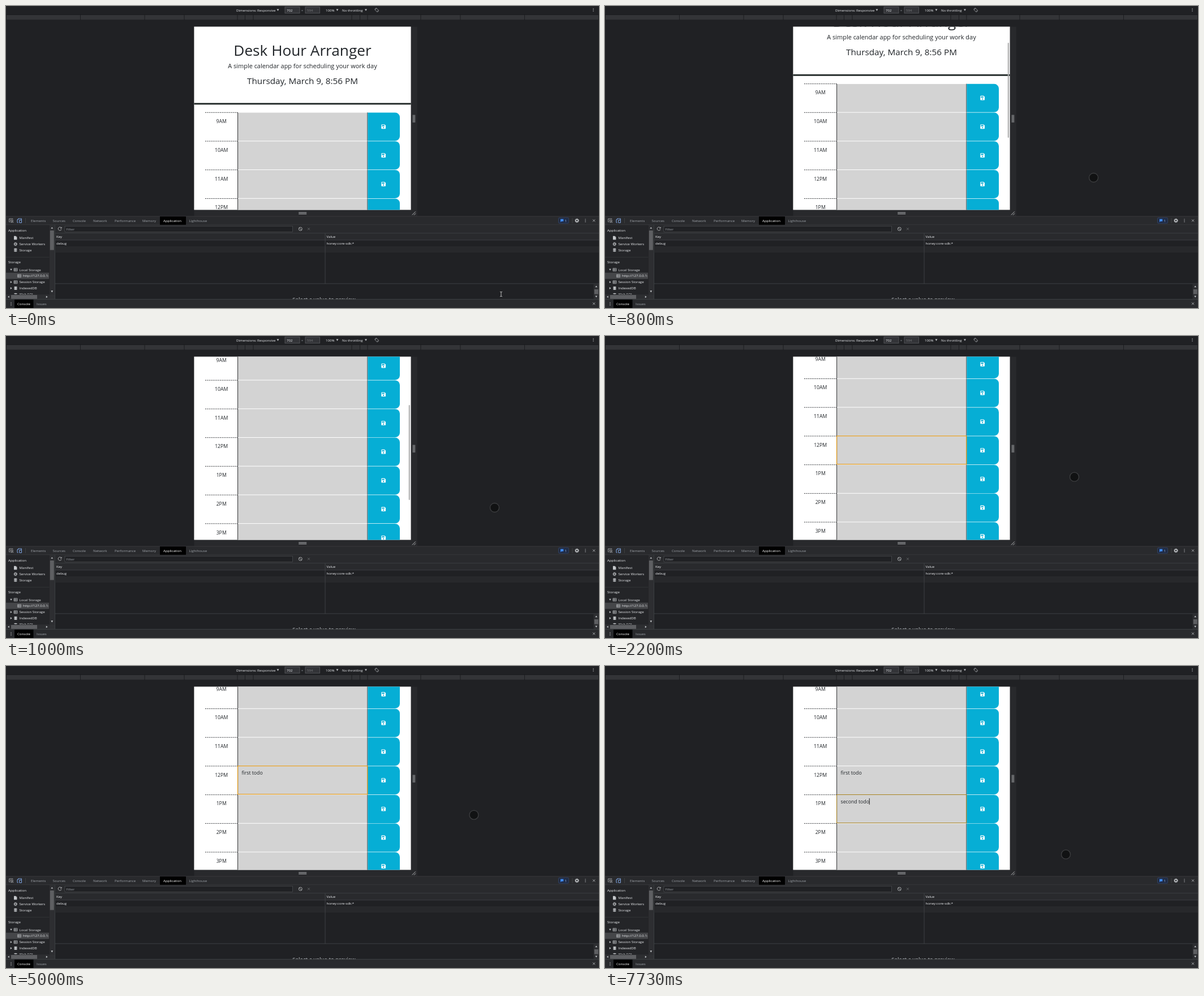
These frames come from a looping animation (1048x534 px, 8 s). An HTML page:

```html
<!DOCTYPE html>
<html lang="en">
<head>
<meta charset="utf-8">
<title>Day planner in a responsive preview</title>
<style>
html, body { margin: 0; width: 100%; height: 100%; overflow: hidden; background: #202124; }
svg { display: block; width: 100vw; height: 100vh; }
text { font-family: "Open Sans", "Noto Sans", sans-serif; white-space: pre; }
.ui text { font-size: 6.15px; fill: #e8eaed; }
.ui .dim { fill: #9aa0a6; }
.page text { fill: #212529; font-size: 8.74px; }
.page .mid { text-anchor: middle; }
</style>
</head>
<body>
<svg id="stage" viewBox="0 0 1048 534" preserveAspectRatio="none">
  <defs>
    <clipPath id="view"><rect x="332.4" y="36.6" width="383.2" height="324"/></clipPath>
    <clipPath id="side"><rect x="0" y="387" width="76" height="123"/></clipPath>
    <clipPath id="preview"><rect x="87" y="491" width="950" height="27.5"/></clipPath>
  </defs>
  <rect width="1048" height="534" fill="#202124"/>
  <g id="chrome" class="ui"></g>
  <g clip-path="url(#view)" class="page">
    <rect x="332" y="36" width="384" height="325" fill="#fff"/>
    <g id="page"></g>
    <rect id="thumb" x="711.8" width="2" height="168" rx="1" fill="#a9a9a9"/>
  </g>
  <g id="touch">
    <circle r="8" fill="#111213" stroke="#3d3e40" stroke-width="1.3"/>
  </g>
  <path id="beam" d="M-2-4.2Q0-4.2 0-3.2Q0-4.2 2-4.2M0-3.2V3.2M-2 4.2Q0 4.2 0 3.2Q0 4.2 2 4.2" fill="none" stroke="#e4e4e4" stroke-width=".8"/>
</svg>
<script>
const NS = "http://www.w3.org/2000/svg";
const $ = id => document.getElementById(id);
const chrome = $("chrome"), page = $("page");

function add(parent, tag, attrs, content) {
  const el = document.createElementNS(NS, tag);
  for (const k in attrs) el.setAttribute(k, attrs[k]);
  if (content !== undefined) el.textContent = content;
  parent.appendChild(el);
  return el;
}
const box = (x, y, width, height, fill, more) =>
  add(chrome, "rect", { x, y, width, height, fill, ...more });
const label = (x, y, s, more) => add(chrome, "text", { x, y, ...more }, s);
const line = (d, stroke = "#c4c7ca", width = .8, more) =>
  add(chrome, "path", { d, stroke, "stroke-width": width, fill: "none", ...more });
const shape = (d, fill = "#c4c7ca") => add(chrome, "path", { d, fill });
const cross = (x, y, color) => line(`M${x - 2} ${y - 2}l4 4m0-4l-4 4`, color);
const down = (x, y, r = 2) => shape(`M${x - r} ${y - r * .8}h${2 * r}l${-r} ${r * 1.7}z`);
const up = (x, y) => shape(`M${x - 1.8} ${y + 1.2}h3.6l-1.8-2.6z`);
const right = (x, y) => shape(`M${x - 1.2} ${y - 1.9}v3.8l2.8-1.9z`);
const left = (x, y) => shape(`M${x + 1.2} ${y - 1.8}v3.6l-2.6-1.8z`);
const ring = (cx, cy, r, more) =>
  add(chrome, "circle", { cx, cy, r, fill: "none", stroke: "#c4c7ca", "stroke-width": .8, ...more });
const dots = (x, y) => [-2.3, 0, 2.3].forEach(d => add(chrome, "circle", { cx: x, cy: y + d, r: .65, fill: "#c4c7ca" }));

function drawTop() {
  label(407, 9.5, "Dimensions: Responsive");
  down(480.5, 7);
  box(493, 1.8, 26, 11, "#333438", { stroke: "#626366", "stroke-width": .7 });
  label(496, 9.5, "702");
  label(521.7, 9.7, "×", { class: "dim" });
  box(529, 1.8, 25.5, 11, "#333438", { stroke: "#626366", "stroke-width": .7 });
  label(532, 9.5, "594", { style: "fill:#77797c" });
  label(565, 9.5, "100%");
  down(585.5, 7);
  label(594, 9.5, "No throttling");
  down(636, 7);
  add(chrome, "rect", { x: 653.2, y: 4.8, width: 4, height: 4.6, transform: "rotate(-45 655.2 7.1)", fill: "none", stroke: "#a5a8ab", "stroke-width": .7 });
  line("M651.6 6.5A3.7 3.7 0 0 1 655 3.5M658.8 7.7A3.7 3.7 0 0 1 655.4 10.7", "#a5a8ab", .7);
  dots(1038, 7);
  box(0, 14.8, 1048, 10.2, "#18191b");
  const half = [87, 101.5, 115, 209, 279, 392.5, 523.5];
  const stops = [...half.map(v => 524 - v).reverse(), ...half.map(v => 524 + v)];
  stops.slice(1).forEach((x, i) => box(stops[i] + .4, 15.8, x - stops[i] - .8, 8.6, "#333437"));
}

function drawFrame() {
  box(715.6, 36.6, 11.2, 335, "#28292c");
  box(332.4, 360.6, 394.4, 11, "#28292c");
  line("M719.7 192.5v13.5M722.2 192.5v13.5", "#b8babd", 1);
  line("M517.2 365.2h14M517.2 367.7h14", "#b8babd", 1);
  line("M717.8 369.5l6-6M721 369.7l3-3", "#b8babd", 1);
}

function drawTabs() {
  box(0, 371.8, 1048, 15.2, "#292a2d");
  box(0, 371.6, 1048, .7, "#3f4043");
  box(0, 386.7, 1048, .7, "#494c50");
  line("M7 381.8h-1.3v-5.6h6.2v1.6M8 378.3l1.3 4.8 1-1.9 1.9 1.9.7-.7-1.9-1.9 1.9-.9z", "#c4c7ca", .7);
  line("M21.5 383h-1.5v-5.3h1.5v-1.7h6v2.3M23.8 378.5h3.7v4.7h-3.7z", "#8ab4f8", .9);
  line("M34.5 375v9", "#4b4d50", .6);
  box(272, 372.2, 46, 14.6, "#000");
  const tabs = { Elements: 44, Sources: 82.5, Console: 118, Network: 154, Performance: 192, Memory: 241, Application: 278, Lighthouse: 323.5 };
  for (const name in tabs)
    label(tabs[name], 381.8, name, { style: name == "Application" ? "fill:#fff" : "fill:#9fa4aa" });
  box(976.5, 374.3, 18, 10, "#202c45", { rx: 1.5, stroke: "#3b4e74", "stroke-width": .6 });
  shape("M980 376.8h5.2v4h-3.6l-1.6 1.5z", "#3f8cff");
  label(987.2, 381.8, "1", { style: "fill:#a9c7fa" });
  line("M1001 375v9", "#4b4d50", .6);
  ring(1009, 379.4, 2.1, { "stroke-width": 1.5 });
  ring(1009, 379.4, 3.3, { "stroke-width": 1, "stroke-dasharray": "1.3 1.29" });
  dots(1024, 379.4);
  cross(1039, 379.4);
}

function drawSidebar() {
  box(0, 387.3, 76.5, 131.2, "#242528");
  const outer = add(chrome, "g", { "clip-path": "url(#side)" });
  const put = (x, y, s) => add(outer, "text", { x, y }, s);
  add(outer, "rect", { x: 0, y: 471.6, width: 76, height: 11, fill: "#454649" });
  put(4, 399.2, "Application");
  put(23.5, 412.2, "Manifest");
  put(23.5, 423.2, "Service Workers");
  put(23.5, 434.2, "Storage");
  put(4, 455.4, "Storage");
  put(23.5, 468.5, "Local Storage");
  put(30, 479.4, "http://127.0.0.1:5500");
  put(23.5, 490.4, "Session Storage");
  put(23.5, 501.3, "IndexedDB");
  put(23.5, 512.2, "Web SQL");
  box(0, 443.8, 76.5, .6, "#3b3c3f");
  shape("M14 406.7h3.4l2 2v4.6h-5.4z");
  ring(16.8, 421, 1.8, { "stroke-width": 1.2 });
  ring(16.8, 421, 2.9, { "stroke-width": .9, "stroke-dasharray": "1.1 1.18" });
  [429.4, 431.5, 433.6].forEach(y => add(chrome, "ellipse", { cx: 16.8, cy: y, rx: 2.9, ry: .9, fill: "#c4c7ca" }));
  const grid = (x, y) => line(`M${x} ${y - 2.5}h6v5h-6zM${x} ${y - .8}h6M${x} ${y + .9}h6M${x + 2.2} ${y - 2.5}v5`, "#b6b9bc", .7);
  grid(14, 466.3); grid(20.5, 477.2); grid(14, 488.2);
  [497, 499, 501].forEach(y => add(chrome, "ellipse", { cx: 17, cy: y, rx: 2.9, ry: .9, fill: "#c4c7ca" }));
  add(chrome, "ellipse", { cx: 17, cy: 508.6, rx: 2.9, ry: .9, fill: "#c4c7ca" });
  down(9, 466.2, 1.8);
  right(9, 488.2); right(9, 499);
  box(76.8, 387.3, 9.2, 123, "#2d2e31");
  box(77.8, 397, 7, 34.5, "#5e5f62");
  up(81.3, 392.3); down(81.3, 504.8, 1.8);
  box(0, 510.2, 76.8, 8.3, "#2d2e31");
  box(9, 511, 46, 6.8, "#5e5f62");
  left(4.5, 514.3); right(72, 514.3);
  box(76.8, 510.2, 9.2, 8.3, "#303134");
  box(86, 387.3, .7, 131.2, "#494c50");
}

function drawTable() {
  box(86.7, 387.3, 962, 14.4, "#292a2d");
  line("M97.8 392.4A3 3 0 1 0 98 395M98.2 390.8v2.2h-2.2");
  box(104, 389.2, 402.5, 10.2, "#202124", { stroke: "#4d4f52", "stroke-width": .7 });
  label(106.5, 396.6, "Filter", { class: "dim" });
  ring(520.3, 394.2, 3);
  line("M518.2 392.1l4.2 4.2");
  cross(535, 394.2, "#696b6e");
  box(86.7, 401.6, 962, 12.4, "#292a2d");
  box(86.7, 401.5, 962, .6, "#494c50");
  box(86.7, 413.6, 962, .6, "#494c50");
  box(86.7, 425, 962, 11, "#27282b");
  label(89, 410.2, "Key");
  label(566.5, 410.2, "Value");
  label(89, 421.7, "debug");
  label(566.5, 421.7, "honey:core-sdk:*");
  box(563.7, 402, .7, 89, "#494c50");
  box(86.7, 490.6, 962, .7, "#494c50");
  const hint = add(chrome, "g", { "clip-path": "url(#preview)" });
  add(hint, "text", { x: 562, y: 521.8, "text-anchor": "middle", style: "font-size:9.4px;font-weight:600;fill:#a0a4a9" }, "Select a value to preview");
  box(1038.5, 491.3, 9.5, 27.2, "#2d2e31");
  box(1039.7, 501, 7, 8.5, "#5e5f62");
  up(1043.2, 496); down(1043.2, 514, 1.8);
}

function drawDrawer() {
  box(0, 518.5, 1048, 15.5, "#292a2d");
  box(0, 518.4, 1048, .7, "#494c50");
  dots(9, 526.7);
  box(15, 519.2, 33.5, 14.8, "#000");
  label(20, 529, "Console", { style: "fill:#fff" });
  label(54, 529, "Issues", { style: "fill:#9fa4aa" });
  cross(1039, 526.3);
}

// Page content, laid out as if not scrolled.
const TOP = 188.3, PITCH = 50.72;
const rowY = i => TOP + i * PITCH;

function drawPage() {
  const head = (y, size, s) => add(page, "text", { x: 524, y, class: "mid", style: `font-size:${size}px` }, s);
  head(88, 26.2, "Desk Hour Arranger");
  head(110, 10.93, "A simple calendar app for scheduling your work day");
  head(137.9, 15.3, "Thursday, March 9, 8:56 PM");
  add(page, "rect", { x: 332, y: 171.5, width: 384, height: 2.8, fill: "#1c2422" });
  for (let i = 0; i < 9; i++) {
    const y = rowY(i), hour = 9 + i;
    add(page, "path", { d: `M352 ${y}H409.4`, stroke: "#24282b", "stroke-width": .9, "stroke-dasharray": "2 1.25" });
    add(page, "text", { x: 380.7, y: y + 18.8, class: "mid" }, (hour > 12 ? hour - 12 : hour) + (hour < 12 ? "AM" : "PM"));
    add(page, "rect", { x: 409.4, y: y + .3, width: 229.6, height: 49.7, fill: "#d3d3d3" });
    add(page, "path", { d: `M409.6 ${y}v50.3M638.9 ${y}v50.3`, stroke: "#1d1f21", "stroke-width": .9 });
    add(page, "path", { d: `M639.4 ${y + .2}h48.4a8.2 8.2 0 0 1 8.2 8.2v33.6a8.2 8.2 0 0 1-8.2 8.2h-48.4z`, fill: "#06aed5" });
    add(page, "path", {
      transform: `translate(663.3 ${y + 21.2})`, fill: "#fff", "fill-rule": "evenodd",
      d: "M.9 0H5.9L7.7 1.8V6.8Q7.7 7.7 6.8 7.7H.9Q0 7.7 0 6.8V.9Q0 0 .9 0zM1.1 1.1V3.2H5.5V1.1zM3.85 4.4a1.1 1.1 0 1 0 .01 0z"
    });
  }
}

drawTop(); drawFrame(); drawTabs(); drawSidebar(); drawTable(); drawDrawer(); drawPage();

// Editable entries: the row, when it has focus, and when each letter lands.
const entries = [
  { row: 3, from: 1670, to: 5400, text: "first todo", ring: "#e39a17", weight: 1.2,
    keys: [2730, 2930, 3070, 3270, 3400, 3530, 3800, 3870, 4130, 4330] },
  { row: 4, from: 5400, to: 8000, text: "second todo", ring: "#a8821f", weight: 1,
    keys: [5800, 6070, 6270, 6600, 6870, 7000, 7130, 7330, 7400, 7600, 7730] }
];
for (const e of entries) {
  const y = rowY(e.row);
  e.outline = add(page, "rect", { x: 409.5, y: y - .2, width: 229.2, height: 50, fill: "none", stroke: e.ring, "stroke-width": e.weight });
  e.label = add(page, "text", { x: 416.5, y: y + 15.1 });
  e.caret = add(page, "rect", { y: y + 6.2, width: .9, height: 11.2, fill: "#111" });
}

const show = (el, on) => el.setAttribute("visibility", on ? "visible" : "hidden");
const clamp = v => Math.max(0, Math.min(1, v));
const ease = v => v * v * (3 - 2 * v);

function track(t, points) {
  let i = 1;
  while (i < points.length - 1 && t > points[i][0]) i++;
  const [t0, a] = points[i - 1], [t1, b] = points[i];
  return a + (b - a) * clamp((t - t0) / (t1 - t0));
}

const scrollKeys = [[665, 0], [735, 22], [800, 50.7], [867, 92], [933, 134], [1000, 160.8], [1067, 163.5]];

function pointer(t) {
  if (t < 1000) {
    const k = ease(clamp((t - 70) / 600)), j = 1 - k;
    return [j * j * 875 + 2 * j * k * 904 + k * k * 863.5, 509.5 - 206 * k];
  }
  const a = ease(clamp((t - 1000) / 333)), b = ease(clamp((t - 4870) / 500));
  return [863.5 - 34 * a - 15 * b, 303.5 - 54.3 * a + 84 * b];
}

function typeEntry(e, t) {
  const count = e.keys.filter(k => t >= k).length;
  const focused = t >= e.from && t < e.to;
  const value = e.text.slice(0, count);
  if (e.label.textContent !== value) e.label.textContent = value;
  show(e.outline, focused);
  const since = t - (count ? e.keys[count - 1] : e.from);
  const lit = focused && Math.floor(since / 530) % 2 == 0;
  show(e.caret, lit);
  if (lit) e.caret.setAttribute("x", 416.3 + (count ? e.label.getComputedTextLength() : 0));
}

function render(t) {
  const step = Math.floor((t + 5) * 15 / 1000) * 1000 / 15; // screen refreshed 15 times a second
  const y = track(step, scrollKeys);
  page.setAttribute("transform", `translate(0 ${-y})`);
  $("thumb").setAttribute("y", 38.7 + .518 * y);
  $("thumb").setAttribute("opacity", y > 0 ? 1 - clamp((step - 1400) / 266) : 0);
  const [px, py] = pointer(step);
  const inDevice = py < 372;
  for (const id of ["touch", "beam"]) $(id).setAttribute("transform", `translate(${px} ${py})`);
  show($("touch"), inDevice);
  show($("beam"), !inDevice);
  entries.forEach(e => typeEntry(e, t));
}

const start = performance.now();
function tick() {
  render((performance.now() - start) % 8000);
  requestAnimationFrame(tick);
}
tick();
</script>
</body>
</html>
```
